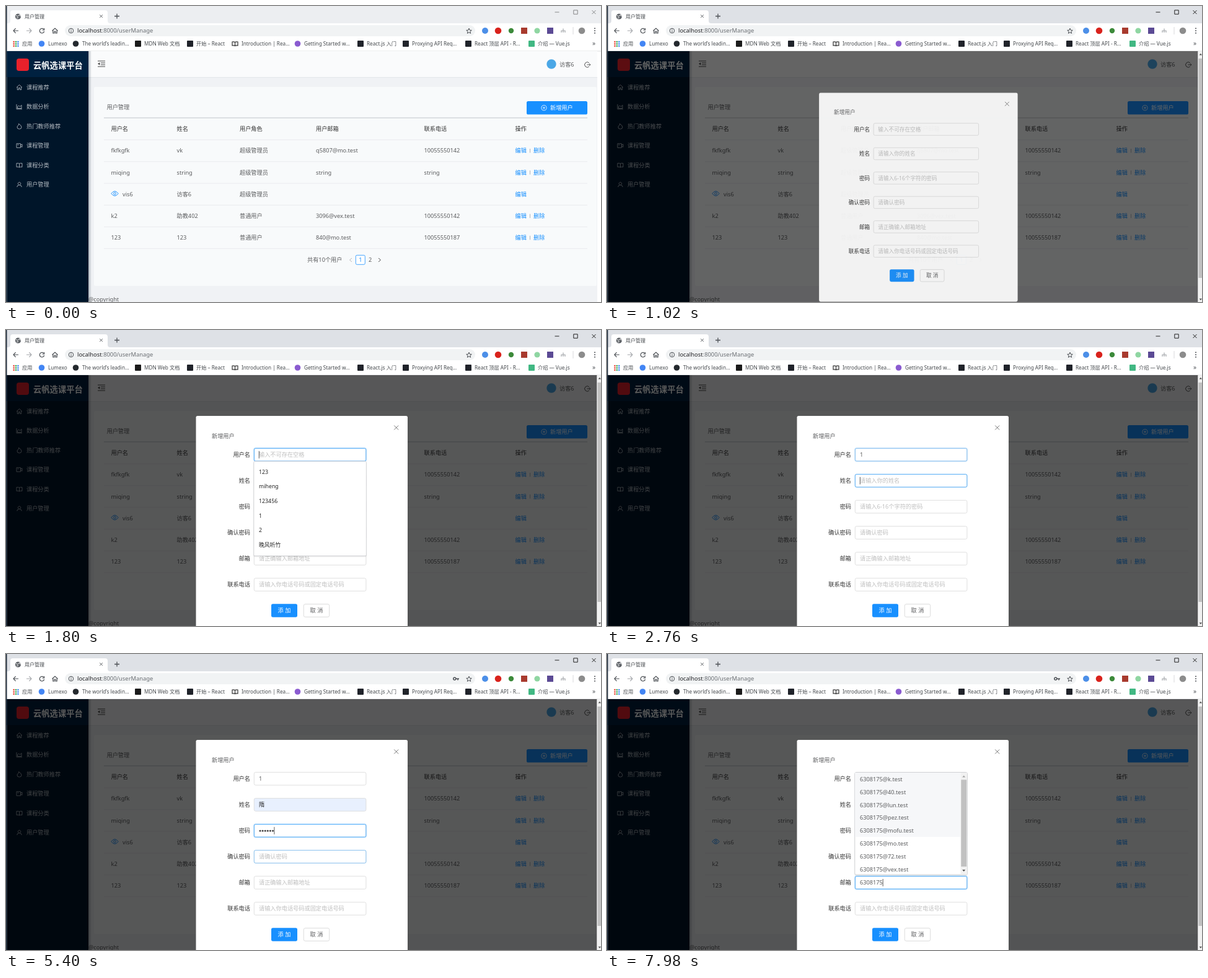
Write an HTML page that moves like this. It is 960 px wide and 479 px high and loops after 8 s.

```html
<!DOCTYPE html>
<html lang="zh-CN">
<head>
<meta charset="utf-8">
<title>用户管理</title>
<style>
html, body { margin: 0; width: 100%; height: 100%; overflow: hidden; background: #fff; }
svg { display: block; width: 100%; height: 100%; }
text { font-family: "Noto Sans", "Noto Sans CJK SC", "Noto Sans CJK", sans-serif; white-space: pre; }
</style>
</head>
<body>
<svg id="stage" viewBox="0 0 960 479" preserveAspectRatio="none">
  <defs>
    <linearGradient id="shade">
      <stop offset="0" stop-color="#001529" stop-opacity=".28"/>
      <stop offset="1" stop-color="#001529" stop-opacity="0"/>
    </linearGradient>
  </defs>
  <g id="browser"></g>
  <g id="page"></g>
  <rect id="mask" x="1.5" y="73" width="952" height="406"/>
  <g id="modal"></g>
  <g id="scroll"></g>
</svg>
<script>
const LOOP = 8000, TICK = 60, SIZE = 9.2, DIGIT = 5.27;
const BLUE = '#1890ff', INK = '#262626', BODY = '#5c5d5f';
const $ = id => document.getElementById(id);

// Drawing helpers; text is placed by its vertical centre.
const text = (x, cy, s, fill = BODY, size = SIZE, extra = '') =>
  `<text x="${x}" y="${cy + size * 0.37}" font-size="${size}" fill="${fill}" ${extra}>${s}</text>`;
const rect = (x, y, w, h, fill, extra = '') =>
  `<rect x="${x}" y="${y}" width="${w}" height="${h}" fill="${fill}" ${extra}/>`;
const disc = (x, y, r, fill, extra = '') =>
  `<circle cx="${x}" cy="${y}" r="${r}" fill="${fill}" ${extra}/>`;
const path = (d, stroke, width = 1, extra = '') =>
  `<path d="${d}" fill="none" stroke="${stroke}" stroke-width="${width}" ${extra}/>`;
const icon = (x, y, d, stroke, width = 1) =>
  path(d, stroke, width, `transform="translate(${x} ${y})"`);

const CROSS = 'M-3-3L3 3M3-3L-3 3';
const BOOK = 'M0-2.5V3.5M0-2.5Q-2-3.5-4.5-3V3Q-2 2.5 0 3.5Q2 2.5 4.5 3V-3Q2-3.5 0-2.5';
const HOUSE = 'M-4.5 .3L0-4L4.5 .3M-3.2-.6V4H-1V1H1V4H3.2V-.6';

function drawBrowser() {
  const dark = '#4d5156';
  let s = rect(0, 0, 960, 73, '#fff') +
    '<rect id="strip" width="960" height="28" fill="#e8eaed"/>' +
    '<path d="M3 28Q7 28 7 24V11Q7 7 11 7H160Q164 7 164 11V24Q164 28 168 28Z" fill="#fff"/>' +
    disc(19.5, 17, 4.6, '#5f6368') +
    path('M16 15.5Q19 18 21 15T23 17M17 19.5L20 18.5', '#fff', 1) +
    text(30, 17, '用户管理', '#45494d', 8) +
    icon(153.5, 16.5, 'M-2.2-2.2L2.2 2.2M2.2-2.2L-2.2 2.2', dark) +
    icon(179, 16.5, 'M-4 0H4M0-4V4', dark, 1.3) +
    '<g id="controls">' + icon(889, 10, 'M-3.5 0H3.5', '#222') +
    icon(919, 10, 'M-3.2-3.2H3.2V3.2H-3.2Z', '#222') +
    icon(948.5, 10, CROSS, '#222') + '</g>';

  s += icon(16, 40, 'M4 0H-4M-.4-3.8L-4 0L-.4 3.8', dark, 1.2) +
    icon(37, 40, 'M-4 0H4M.4-3.8L4 0L.4 3.8', '#a5a8ac', 1.2) +
    icon(58, 40, 'M2.8-2.3A3.7 3.7 0 1 0 3.6 1M3.6-4V-1H.6', dark, 1.2) +
    icon(79, 40, HOUSE, dark, 1.2) +
    rect(95, 31, 662, 18, '#f1f3f4', 'rx="9"') +
    disc(105, 40, 3.8, 'none', `stroke="${dark}"`) +
    path('M105 39.5V42.3M105 37.4V38.5', dark) +
    text(115, 40, 'localhost<tspan fill="#6a6e73">:8000/userManage</tspan>', '#202124', 9.4) +
    '<g id="key">' + disc(723.8, 40, 2, 'none', `stroke="${dark}" stroke-width="1.5"`) +
    path('M725.8 40H731M729 40V42.5', dark, 1.5) + '</g>' +
    icon(747, 40.3, 'M0-4.2L1.2-1.2L4.3-1L1.9 1L2.7 4L0 2.3L-2.7 4L-1.9 1L-4.3-1L-1.2-1.2Z', dark);

  s += disc(773, 40, 5, '#4c8fe8') + disc(794, 40, 5.3, '#d9221c') + disc(815, 40, 4.2, '#3c8a3a') +
    rect(831, 35, 10, 10, '#a83a2e') + disc(857, 40, 4.6, '#8fd6a2') +
    rect(873, 35, 10, 10, '#5b4a94') +
    icon(899, 40, 'M0-3.5V0M-3 3V0H3V3M0 0V3', '#a5a8ac', 1.2) +
    path('M915 34V46', '#d7d9dc') + disc(929, 40, 5.3, '#8c8c8c') +
    [36.3, 40, 43.7].map(y => disc(950, y, 1, dark)).join('');

  for (let i = 0; i < 9; i++)
    s += rect(11.5 + i % 3 * 3.4, 56.8 + Math.floor(i / 3) * 3.4, 2.3, 2.3,
      ['#ea4335', '#34a853', '#4285f4', '#fbbc05'][(i + Math.floor(i / 3)) % 4]);

  const marks = [
    [26, '应用'], [68, 'Lumexo', 'c', '#4285f4'], [123, 'The world’s leadin...', 'c', '#24292e'],
    [223, 'MDN Web 文档', 's', '#1b1b1b'], [307, '开始 – React', 's', '#20232a'],
    [380, 'Introduction | Rea...'], [481, 'Getting Started w...', 'c', '#8a5bd0'],
    [582, 'React.js 入门', 's', '#20232a'], [655, 'Proxying API Req...', 's', '#20232a'],
    [756, 'React 顶层 API - R...', 's', '#20232a'], [858, '介绍 — Vue.js', 's', '#41b883']
  ];
  for (const [x, label, shape, fill] of marks) {
    s += text(x, 61.3, label, '#45494d', 8.2);
    if (shape === 'c') s += disc(x - 10.5, 61, 4.8, fill);
    if (shape === 's') s += rect(x - 15, 56, 10, 10, fill, 'rx="1"');
  }
  s += icon(369.5, 61, BOOK, '#333', 1.2) + text(946, 60.5, '»', dark, 10) +
    path('M0 73H960', '#d4d6d9', 0.8);
  $('browser').innerHTML = s;
}

const rows = [
  ['fkfkgfk', 'vk', '超级管理员', 'q5807@mo.test', '10055550142'],
  ['miqing', 'string', '超级管理员', 'string', 'string'],
  ['vis6', '访客6', '超级管理员', '', ''],
  ['k2', '助教402', '普通用户', '3096@vex.test', '10055550142'],
  ['123', '123', '普通用户', '840@mo.test', '10055550187']
];
const columns = [169.5, 275.5, 377, 500, 674.5, 821.5];
const rowY = i => 234 + i * 35.2;

function drawPage() {
  const pale = '#a9b0b8';
  let s = rect(1, 73, 953, 406, '#f0f2f5') +
    rect(133, 73, 821, 42, '#fafbfc') + path('M133 115.5H954', '#e3e6ea') +
    rect(142, 131, 811, 322, '#f8fafb', 'rx="2"') +
    rect(0, 0, 1.5, 479, '#1d2b3a') + rect(1.5, 73, 131.5, 406, '#001529') +
    rect(1.5, 73, 131.5, 42, '#002140') + rect(133, 73, 5, 406, 'url(#shade)') +
    rect(17, 85, 20, 20, '#e8212b', 'rx="4"') +
    text(44, 96, '云帆选课平台', '#fff', 13.3, 'font-weight="700"');

  const menu = [
    ['课程推荐', HOUSE],
    ['数据分析', 'M-4.5-4V3.8H4.5M-3 2.6V0L-1-2L1 0L3.5-2.6V2.6Z'],
    ['热门教师推荐', 'M-1-4Q3.7-1 3.5 1.5A3.4 3 0 0 1-3.5 1.5Q-3.4-.6-1.6-1.3Q-.6-2-1-4'],
    ['课程管理', 'M-4.5-3.3H2V3.3H-4.5ZM2-1L4.5-2.3V2.3L2 1M-3-1.3H-1'],
    ['课程分类', BOOK],
    ['用户管理', 'M-3.8 4Q-3.5 .6 0 .6T3.8 4M0 .6A2.2 2.2 0 1 1 .1 .6']
  ];
  menu.forEach(([label, d], i) => {
    const y = 131.5 + i * 31.5;
    s += icon(21.5, y, d, pale, 0.9) + text(33, y, label, '#b4bac1');
  });

  s += path('M148 89H160M153 92H160M153 95H160M148 98H160', '#444', 1) +
    '<path d="M151.4 91.2V95.8L148 93.5Z" fill="#444"/>' +
    disc(880, 94, 7.7, '#4ba7e6') + text(893, 95, '访客6') +
    icon(938, 95, 'M2.8-3A4.2 4.2 0 1 0 2.8 3M-.5 0H5M3.3-1.7L5 0L3.3 1.7', '#555') +
    text(162.5, 164, '用户管理') + path('M158 181H938', '#d3d6da', 1.4) +
    '<rect id="add" x="840" y="154" width="98" height="21.5" rx="2.6"/>' +
    disc(868, 164.8, 4.1, 'none', 'stroke="#fff" stroke-width=".8"') +
    icon(868, 164.8, 'M-2 0H2M0-2V2', '#fff', 0.8) + text(878, 165, '新增用户', '#fff');

  ['用户名', '姓名', '用户角色', '用户邮箱', '联系电话', '操作'].forEach((h, i) =>
    s += text(columns[i], 199, h, '#333'));
  for (let i = 0; i < 6; i++) s += path(`M158 ${216.6 + i * 35.2}H938`, '#e6e8eb', 0.8);
  rows.forEach((row, r) => {
    const y = rowY(r), self = r === 2;
    row.forEach((cell, c) => s += text(columns[c] + (self && c === 0 ? 18.5 : 0), y, cell));
    s += text(columns[5], y, '编辑', BLUE);
    if (!self) s += path(`M845.5 ${y - 3}v6.5`, '#9aa4ae', 0.8) + text(851, y, '删除', BLUE);
  });
  s += icon(175.5, 303.5, 'M-5.6 0Q0-7.6 5.6 0Q0 7.6-5.6 0Z', BLUE) +
    disc(175.5, 303.5, 1.8, 'none', `stroke="${BLUE}"`);

  s += text(486, 411, '共有10个用户') + icon(556, 411, 'M2-3L-1.5 0L2 3', '#bbb') +
    rect(564.3, 403.3, 15, 15, '#fff', `stroke="${BLUE}" stroke-width=".8" rx="2"`) +
    text(569.3, 411, '1', BLUE) + text(585, 411, '2') +
    icon(603, 411, 'M-2-3L1.5 0L-2 3', '#555') + text(133, 474.5, '@copyright');
  $('page').innerHTML = s;
}

// The window reaches past the right edge, so the bar is cut off there.
function drawScroll() {
  $('scroll').innerHTML = rect(953.5, 73.5, 7, 406, '#f1f1f1') + rect(954.5, 85, 6, 355, '#c1c1c1') +
    '<path d="M955.6 79.5L957.8 76.8L960 79.5ZM955.6 473.5L957.8 476.2L960 473.5Z" fill="#505050"/>';
}

const fields = [
  { label: '用户名', hint: '输入不可存在空格', hover: 1260, focus: 1380, blur: 2700 },
  { label: '姓名', hint: '请输入你的姓名', hover: 2580, focus: 2700, blur: 4020 },
  { label: '密码', hint: '请输入6-16个字符的密码', hover: 3900, focus: 4020, blur: 5520 },
  { label: '确认密码', hint: '请确认密码', hover: 5280, focus: 5520, blur: 7080 },
  { label: '邮箱', hint: '请正确输入邮箱地址', hover: 6960, focus: 7080, blur: LOOP },
  { label: '联系电话', hint: '请输入你电话号码或固定电话号码', hover: LOOP, focus: LOOP, blur: LOOP }
];
const fieldY = i => 201.8 + i * 42.05;

const userNames = ['123', 'miheng', '123456', '1', '2', '晚风听竹'];
const realNames = ['隋', '123', 'string', '1', '访客6', '晚风听竹'];
const account = '6308175';
const hosts = ['k', '40', 'lun', 'pez', 'mofu', 'mo', '72', 'vex'];

// Typing times: the n-th entry is when the n-th character appears.
const typed = {
  2: [4440, 4500, 4860, 4860, 5100, 5280],
  3: [5820, 5940, 6060, 6300, 6540, 6720],
  4: [7380, 7740, 7800, 7860, 7920, 7980, 7980]
};
const count = (i, t) => typed[i].filter(k => t >= k).length;
const clamp = v => Math.min(1, Math.max(0, v));
const ramp = (t, from, ms) => clamp((t - from) / ms);

// cubic-bezier(.08, .82, .17, 1)
function ease(x) {
  let lo = 0, hi = 1;
  const curve = (u, a, b) => 3 * (1 - u) ** 2 * u * a + 3 * (1 - u) * u * u * b + u ** 3;
  for (let i = 0; i < 24; i++) {
    const mid = (lo + hi) / 2;
    curve(mid, 0.08, 0.17) < x ? lo = mid : hi = mid;
  }
  return curve(lo, 0.82, 1);
}

function fieldValue(i, t) {
  if (i === 0) return t >= 1980 ? '1' : '';
  if (i === 1) return t >= 3060 ? '隋' : '';
  if (i === 4) return account.slice(0, count(4, t));
  return '';
}

function field(f, i, t) {
  const y = fieldY(i), dots = i === 2 || i === 3 ? count(i, t) : 0;
  const value = fieldValue(i, t), focused = t >= f.focus && t < f.blur;
  const fill = i === 1 && value ? '#e8f0fe' : '#fff';
  const box = (color, width, extra = '') => rect(400.3, y - 10.4, 180.6, 20.8, 'none',
    `rx="2.4" stroke="${color}" stroke-width="${width}" ${extra}`);
  const glow = ramp(t, f.focus, 180) * (1 - ramp(t, f.blur, 180));
  const edge = ramp(t, f.hover, 180) * (1 - ramp(t, f.blur, 180));
  let s = text(394, y, f.label, '#333', SIZE, 'text-anchor="end"') +
    rect(400.3, y - 10.4, 180.6, 20.8, fill, 'rx="2.4"') +
    box(BLUE, 2.6, `opacity="${0.16 * glow}"`) + box('#d9d9d9', 0.8) +
    box('#40a9ff', 0.8, `opacity="${edge}"`);
  if (value) s += text(408, y, value, i === 1 ? INK : BODY);
  else if (!dots) s += text(408, y, f.hint, '#bfbfbf');
  for (let d = 0; d < dots; d++) s += disc(410 + d * 4.1, y + 0.3, 1.45, '#444');
  if (focused) {
    const x = 408 + dots * 4.1 + value.length * (i === 1 ? SIZE : DIGIT);
    s += path(`M${x + 0.3} ${y - 6}v12`, '#333', 0.8);
  }
  return s;
}

function panel(y, h) {
  return rect(399, y + 1, 183, h + 1, '#000', 'opacity=".07" rx="3"') +
    rect(399.8, y, 181.6, h, '#fff', 'rx="2" stroke="#c9cbce" stroke-width=".8"');
}

function suggestions(list, i, picked) {
  const top = fieldY(i) + 10.8;
  let s = panel(top, list.length * 23.7 + 10.7);
  list.forEach((name, k) => {
    const y = top + 16.7 + k * 23.7;
    if (k === picked) s += rect(400.2, y - 11.8, 180.8, 23.6, '#ececec');
    s += text(408, y, name, INK, 8.8);
  });
  return s;
}

function mailList(id) {
  let s = panel(191.5, 165.5) + rect(400.3, 192, 170, 104, '#f6f7f9') +
    rect(570.5, 192, 10.5, 164.6, '#f1f1f1') + rect(571.3, 203.5, 8.9, 140.5, '#c1c1c1') +
    '<path d="M573.2 199.5L575.7 196.5L578.2 199.5Z" fill="#a3a3a3"/>' +
    '<path d="M573.2 349L575.7 352L578.2 349Z" fill="#505050"/>';
  hosts.forEach((h, k) => s += text(408, 202.5 + k * 20.8, `${id}@${h}.test`));
  return s;
}

function modal(t) {
  let s = rect(306.5, 139, 341.5, 360, '#fff', 'rx="2.6"') +
    icon(629.7, 158, 'M-3.5-3.5L3.5 3.5M3.5-3.5L-3.5 3.5', '#777') + text(332, 172, '新增用户');
  fields.forEach((f, i) => s += field(f, i, t));
  s += rect(428, 443.3, 42, 21.4, BLUE, 'rx="2.6"') +
    text(449, 454, '添 加', '#fff', SIZE, 'text-anchor="middle"') +
    rect(480.3, 443.6, 41.4, 20.8, '#fff', 'rx="2.6" stroke="#d9d9d9" stroke-width=".9"') +
    text(501, 454, '取 消', BODY, SIZE, 'text-anchor="middle"');
  if (t >= 1560 && t < 2700)
    s += suggestions(t < 1980 ? userNames : userNames.filter(n => n[0] === '1'), 0, -1);
  if (t >= 2880 && t < 3480) s += suggestions(realNames, 1, t >= 3060 ? 0 : -1);
  if (t >= 7380) s += mailList(fieldValue(4, t));
  return s;
}

function render(t) {
  const active = t >= 420, open = t >= 1020;
  const shown = open ? ease(ramp(t, 905, 295)) : 0;
  const hover = open ? 0 : ramp(t, 660, 240);
  const mix = (a, b) => Math.round(a + (b - a) * hover);

  $('strip').setAttribute('fill', active ? '#dee1e6' : '#eceef1');
  $('controls').setAttribute('opacity', active ? 1 : 0.5);
  $('scroll').setAttribute('opacity', active ? 1 : 0);
  $('key').setAttribute('opacity', t >= 4440 ? 1 : 0);
  $('mask').setAttribute('opacity', 0.65 * shown);
  $('add').setAttribute('fill', `rgb(${mix(24, 64)},${mix(144, 169)},255)`);

  // The dialog grows out of the clicked button.
  const scale = 0.2 + 0.8 * shown;
  $('modal').setAttribute('opacity', shown);
  $('modal').setAttribute('transform', `translate(885 165) scale(${scale}) translate(-885 -165)`);
  $('modal').innerHTML = open ? modal(t) : '';
}

drawBrowser();
drawPage();
drawScroll();

let last = -1;
function tick() {
  const t = Math.floor(performance.now() % LOOP / TICK) * TICK;
  if (t !== last) render(last = t);
  requestAnimationFrame(tick);
}
tick();
</script>
</body>
</html>
```
